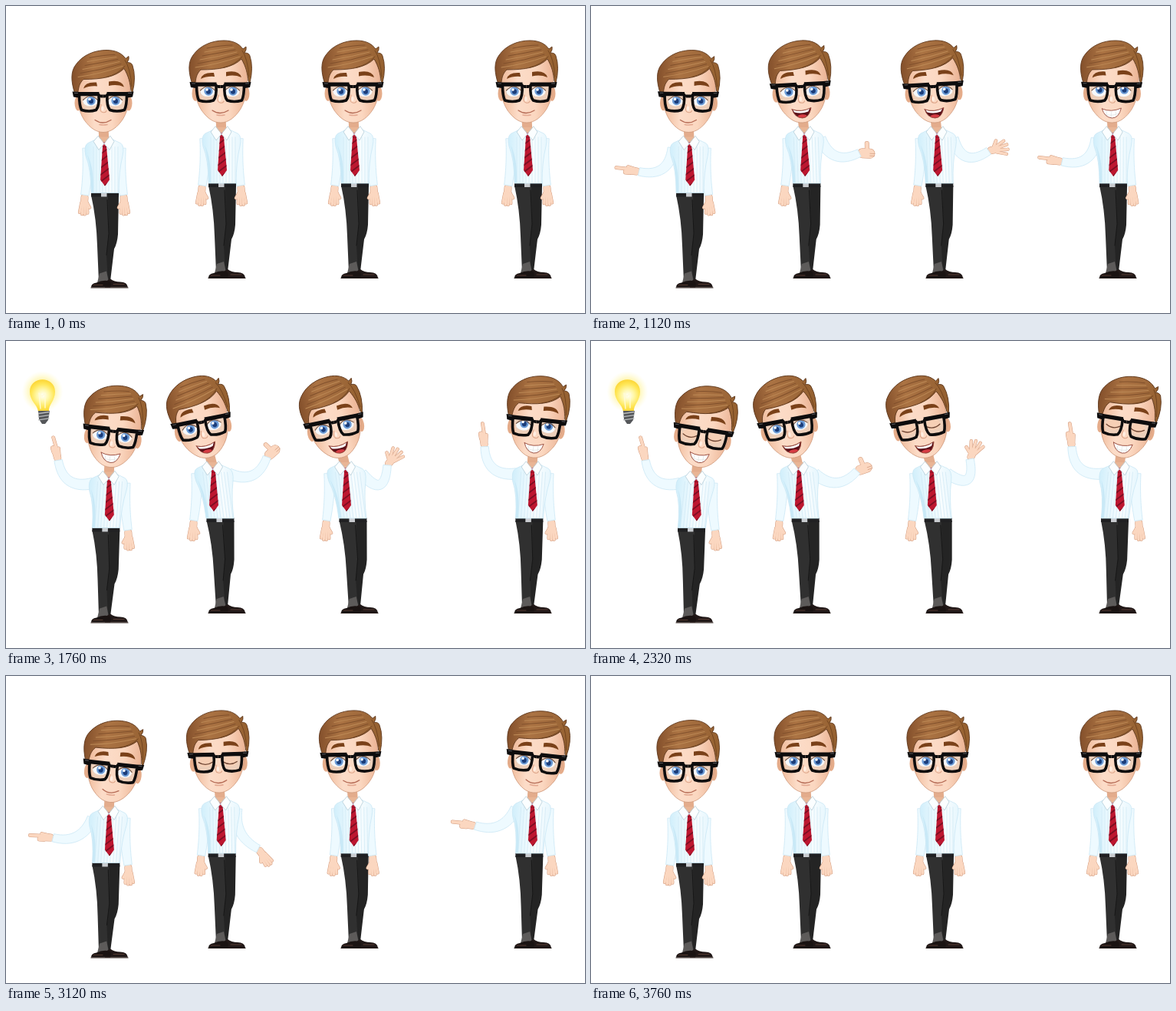
Recreate the animation shown at these times as an HTML page with a canvas. Size 755 by 400 pixels, loop 3840 ms.

```html
<!DOCTYPE html>
<html lang="en">
<head>
<meta charset="utf-8">
<title>Four presenters</title>
<style>
html, body { margin: 0; width: 100%; height: 100%; overflow: hidden; background: #fff; }
canvas { display: block; width: 755px; height: 400px; }
</style>
</head>
<body>
<canvas id="stage" width="755" height="400"></canvas>
<script>
const LOOP = 3840, STEP = 80;
const g = document.getElementById('stage').getContext('2d');
const SKIN = '#fbd7c0', SHADE = '#d39b7d', SLEEVE = '#cbe8f5';

const fill = (d, color) => { g.fillStyle = color; g.fill(new Path2D(d)); };
const line = (d, color, w) => {
  g.strokeStyle = color;
  g.lineWidth = w;
  g.stroke(new Path2D(d));
};
const shape = (d, color, edge, w = .8) => { fill(d, color); line(d, edge, w); };
const oval = (x, y, rx, ry, color) => {
  g.fillStyle = color;
  g.beginPath();
  g.ellipse(x, y, rx, ry, 0, 0, 7);
  g.fill();
};
const group = draw => { g.save(); draw(); g.restore(); };
const stops = (gradient, colors) => {
  colors.forEach((c, i) => gradient.addColorStop(i / (colors.length - 1), c));
  return gradient;
};
const across = (x0, x1, ...colors) => stops(g.createLinearGradient(x0, 0, x1, 0), colors);
const round = (x, y, r, ...colors) => stops(g.createRadialGradient(x, y, 1, x, y, r), colors);

const ease = (t, [from, to]) => {
  const u = Math.min(1, Math.max(0, (t - from) / (to - from)));
  return u * u * (3 - 2 * u);
};
const within = (t, [from, to]) => t >= from && t < to;

// Each digit starts at the knuckle x, y and points along its angle
function digits(kind) {
  const digit = (x, y, angle, length, w) =>
    [`M${x} ${y}l${length * Math.cos(angle)} ${length * Math.sin(angle)}`, w];
  const palm = digit(3, 0, 0, 8, 9);
  if (kind === 'thumb') return [digit(4, 0, 0, 10, 12), digit(10, 3, 1.65, 10, 5)];
  if (kind === 'point')
    return [digit(12, -2, 0, 5, 6), palm, digit(10, 2, 0, 20, 3.8), digit(6, 3, .2, 9, 3.5)];
  const spread = kind === 'open' ? .27 : .08;
  const list = [palm, digit(5, 0, kind === 'open' ? 1 : -.6, 13, 3.6)];
  for (let i = -1.5; i < 2; i++) list.push(digit(10, i * 2.4, i * spread, 16 - Math.abs(i) * 2, 3.3));
  return list;
}

function hand(kind, x, y, angle, side) {
  group(() => {
    g.translate(x, y);
    g.rotate(angle);
    g.scale(1, -side);
    for (const [color, extra] of [[SHADE, 1], [SKIN, 0]])
      for (const [d, w] of digits(kind)) line(d, color, w + extra);
    if (kind === 'thumb') line('M14-3h6M14 0h6', SHADE, .7);
  });
}

// Lift is the angle away from hanging straight down, in degrees
function arm(side, lean, lift, reach, curl, kind) {
  const angle = a => Math.PI / 2 - side * a * Math.PI / 180;
  const sx = 281 + side * 21 + lean, sy = 173, a = angle(lift);
  const dx = reach * Math.cos(a), dy = reach * Math.sin(a), x = sx + dx, y = sy + dy;
  const bend = 1.5 * Math.sqrt(Math.max(0, 33 * 33 - reach * reach / 4)) * Math.min(1, Math.abs(dx) / 30);
  const cx = sx + dx / 2 - side * dy / reach * bend, cy = sy + dy / 2 + side * dx / reach * bend;
  hand(kind, x, y, angle(lift + curl), side);
  const near = [], far = [];
  for (let u = 0; u <= 1; u += 1 / 16) {
    const v = 1 - u;
    const px = v * v * sx + 2 * u * v * cx + u * u * x;
    const py = v * v * sy + 2 * u * v * cy + u * u * y;
    const tx = v * (cx - sx) + u * (x - cx), ty = v * (cy - sy) + u * (y - cy);
    const w = (7.2 - 2 * u) / Math.hypot(tx, ty);
    near.push(`${px - ty * w} ${py + tx * w}`);
    far.unshift(`${px + ty * w} ${py - tx * w}`);
  }
  shape('M' + near.concat(far).join('L') + 'Z', '#eefaff', SLEEVE);
}

function legs(dx) {
  group(() => {
    const k = dx * .1 / 115;
    g.transform(1, 0, -k, 1, k * 350, 0);
    fill('M279 234H300L299 285Q298 297 294 304L289 346H277L283 290Z', '#242424');
    fill('M264 234H286L287 284 284 312 286 347H274L272 300Q271 265 264 234Z', '#303030');
    line('M285 240L287 284 284 312', '#171717', 1);
    fill('M275 336L284 333 287 347 272 348Z', '#5d5b5a');
    fill('M264 230.5H300V236H264Z', '#202022');
    fill('M277 231h7.5v5h-7.5Z', '#c9ccd0');
  });
  fill('M282 351Q283 345 289 343 294 347 302 347 311 347 312 354H282Z', '#211817');
  fill('M264 354Q264 349 271 348 279 344 288 346 291 350 289 354Z', '#1a1312');
  line('M264 354.5H312', '#1c0f0a', 1.2);
  line('M267 351h12M293 350h14', '#65463a', .8);
}

function tie() {
  const d = 'M277.5 165H285L284 171 288 214 282 222 276 214 279 171Z';
  fill(d, '#bd1730');
  g.clip(new Path2D(d));
  for (let y = 178; y < 225; y += 9) line(`M274 ${y + 4}L290 ${y - 8}`, '#7d0e22', 1.8);
  line('M278 171h7', '#7d0e22', .9);
}

function torso(dx, lean) {
  group(() => {
    const k = (lean - dx * .1) / 68;
    g.transform(1, 0, -k, 1, dx * .1 + k * 235, 0);
    shape('M273 160L260 166Q254 169 257 183 264 200 264 231H300Q300 203 305 183 308 169 302 166L289 160Z',
      across(257, 306, '#d2effb', '#e9f8fe', '#f8fdff', '#e6f6fd'), SLEEVE);
    for (let x = 267; x < 300; x += 4) line(`M${x} 171V230`, '#cfe8f4', .7);
    fill('M259 181Q268 198 267 230H264Q264 200 259 181Z', '#c9e9f7');
    fill('M274 162L281 168 288 162V158H274Z', '#e9b595');
  });
  group(() => { g.translate(lean, 0); tie(); });
  group(() => {
    g.translate(lean * 1.04, 0);
    shape('M273 157L267 164 274 175 281 167Z', '#fbfeff', '#b5cdd9');
    shape('M289 157L294 164 288 175 281 167Z', '#fbfeff', '#b5cdd9');
  });
}

function hair() {
  shape('M242 99C238 86 237 73 244 64 253 51 269 45 284 45 296 45 304 49 309 56L313 53Q314 57 311 61 317 61 318 65 323 80 318 100L316 98C315 88 313 79 307 69 296 80 278 83 254 83 249 88 248 92 247 99Z',
    across(240, 321, '#85512c', '#ab7343', '#a06a3c', '#94602f'), '#5f381d', .9);
  for (let i = 0; i < 6; i++)
    line(`M${247 + i * 3} ${80 - i * 5}Q${276 + i} ${76 - i * 5} ${305 - i * 2} ${66 - i * 3}`,
      i % 2 ? '#80502c' : '#bd8a56', 1);
  line('M308 58Q315 68 317 92M308 66Q298 77 284 80', '#70431f', .9);
}

function eye(x, shut, up) {
  if (shut) {
    oval(x, 111, 9.5, 7, '#f6cfb5');
    line(`M${x - 9} 112Q${x} 118 ${x + 9} 112`, '#6f4634', 1.3);
    return;
  }
  oval(x, 111.5, 9.5, 6.6, '#f6f8fb');
  oval(x + 1, 111 - up, 5.6, 5.8, '#6b9bd6');
  oval(x + 1, 111.5 - up, 3, 3.2, '#1b3d7a');
  oval(x - 1, 109 - up, 1.8, 1.8, '#fff');
  line(`M${x - 9.5} 110Q${x} 100 ${x + 9.5} 110`, '#70503f', 1.1);
}

function glasses() {
  for (const s of [-1, 1]) {
    group(() => {
      g.translate(279.5, 0);
      g.scale(s, 1);
      line('M5.5 103H31Q31 117 28 123 18 126 9 123 4.5 118 5.5 103Z', '#0d0c0d', 3.6);
      fill('M0 103H5V99.5H30L40 99 38.5 106 32 107 30 104H5L3 107H0Z', '#0d0c0d');
      line('M33 101h4', '#56565a', 1);
    });
  }
}

function mouth(kind) {
  if (kind === 'smile') {
    line('M269 136Q279 143 290 136', '#b56b55', 1.3);
    line('M275 142Q280 143 285 142', '#e3a891', 1.6);
    return;
  }
  const d = 'M267 134Q279 139 292 133 289 146 280 146 270 145 267 134Z';
  if (kind === 'grin') {
    fill(d, '#fff');
    line('M273 137v7M279 138v8M285 137v7M270 141Q279 144 289 140', '#d9dede', .6);
  } else {
    fill(d, '#5c1119');
    oval(280, 143.5, 6, 2.2, '#d63b43');
    fill('M268 134.5Q279 139 290 134L288 138Q279 141 270 138Z', '#fff');
  }
  line(d, '#9b4e40', .9);
}

function head(dx, face, shut, up) {
  group(() => {
    const a = dx * .46 * Math.PI / 180;
    g.translate(280 + dx - 46 * Math.sin(a), 150);
    g.rotate(a);
    g.translate(-280, -150);
    oval(247, 114, 4.5, 10, '#e5ac8a');
    oval(313, 114, 4.5, 10, '#e5ac8a');
    shape('M246 84C245 106 246 122 255 136 263 147 271 152 280 152 290 152 299 145 306 134 313 122 316 104 314 84L306 66 250 74Z',
      across(246, 314, '#efb998', '#fcdcc8', '#fbd7c0', '#ecb596'), '#d09a7c');
    hair();
    const lift = face === 'smile' ? 0 : 1.5;
    fill(`M254 ${95 - lift}Q256 ${86 - lift} 271 ${87 - lift}L272 ${92 - lift}Q262 ${91 - lift} 254 ${95 - lift}Z`, '#7a4119');
    fill(`M287 ${86 - lift}Q304 ${83 - lift} 307 ${93 - lift}Q298 ${89 - lift} 287 ${91.5 - lift}Z`, '#7a4119');
    fill('M249 103h25l-2 20h-17ZM285 103h25l-3 20h-17Z', '#edcfba');
    eye(263, shut, up);
    eye(295, shut, up);
    line('M277 116Q274 125 279 126 283 127 284 124', '#dda488', 1.1);
    oval(279, 121, 1.6, 3, '#ffeee2');
    glasses();
    mouth(face);
  });
}

function bulb(alpha) {
  if (alpha <= 0) return;
  group(() => {
    g.globalAlpha = alpha;
    oval(47.5, 66, 27, 27, round(47.5, 66, 27, '#ffea60', '#ffee80', 'rgba(255,244,160,.55)', 'rgba(255,250,200,0)'));
    fill('M42 92C41 83 31 78 31 66 31 45 64 45 64 66 64 78 55 83 56 92Z',
      round(48, 71, 22, '#fffef0', '#fff7a8', '#ffe758', '#fbd02c'));
    line('M45 88L43 68 47 72 51 68 51 87', '#fffbd8', 1.3);
    fill('M42 91H57L55 103 51 108H47L43 102Z', '#55575a');
    for (let y = 93.5; y < 104; y += 4.2) line(`M42.5 ${y + 1}L56 ${y - 1}`, '#b9bcbe', 1.3);
  });
}

// Arms go out, rise and fall; heads sway over and back. Tilt, lifts and curl are amounts
const pointer = { side: -1, hand: 'point', face: 'grin', tilt: 20, curl: 40, tuck: 0, wave: 0,
  out: 45, up: 75, rise: [1000, 1640], fall: [2720, 3520], busy: [400, 3360],
  sway: [1000, 2240], back: [2760, 3700], talk: [1200, 2800], blink: [2240, 2480], gaze: 0 };
const talker = { ...pointer, side: 1, hand: 'thumb', face: 'open', tilt: -25, curl: 17,
  out: 66, up: 44, rise: [1360, 1760], fall: [1800, 3700], busy: [480, 2880],
  sway: [960, 1440], back: [2100, 3400], talk: [480, 2800], blink: [3040, 3200] };
const men = [
  { ...pointer, x: -153, y: 12.5 },
  { ...talker, x: 0, y: 0 },
  { ...talker, x: 173, y: 0, hand: 'open', curl: 31, tuck: 19, wave: 9, out: 54, up: 58,
    rise: [960, 1440], fall: [2320, 3040], busy: [480, 2800], blink: [2240, 2480] },
  { ...pointer, x: 399, y: 0, up: 82, talk: [560, 2800], gaze: 2 }
];

function drawMan(m, t) {
  const dx = m.tilt * (ease(t, m.sway) - ease(t, m.back)), lean = dx * .44;
  const out = ease(t, [240, 720]), up = ease(t, m.rise), held = 1 - ease(t, m.fall);
  const wave = m.wave * up * Math.cos((t - 1440) / 800 * 2 * Math.PI);
  const lift = (m.out * out + m.up * up + wave) * held;
  const reach = 61 - (7 * out + m.tuck * up) * held;
  const talking = within(t, m.talk);
  group(() => {
    g.translate(m.x, m.y);
    legs(dx);
    arm(-m.side, lean, 4, 61, 0, 'rest');
    arm(m.side, lean, 4 + lift, reach, m.curl * out * Math.sqrt(held), within(t, m.busy) ? m.hand : 'rest');
    line(`M${280 + dx * .6} 146L${281 + lean} 166`, '#e3ac8c', 13);
    torso(dx, lean);
    head(dx, talking ? m.face : 'smile', within(t, m.blink), talking ? m.gaze : 0);
  });
}

function render(now) {
  const t = Math.floor(now % LOOP / STEP) * STEP;
  g.fillStyle = '#fff';
  g.fillRect(0, 0, 755, 400);
  g.lineCap = g.lineJoin = 'round';
  bulb(ease(t, [1120, 1360]) - ease(t, [2560, 2800]));
  men.forEach(m => drawMan(m, t));
}

const start = performance.now();
(function tick() {
  render(performance.now() - start);
  requestAnimationFrame(tick);
})();
</script>
</body>
</html>
```
